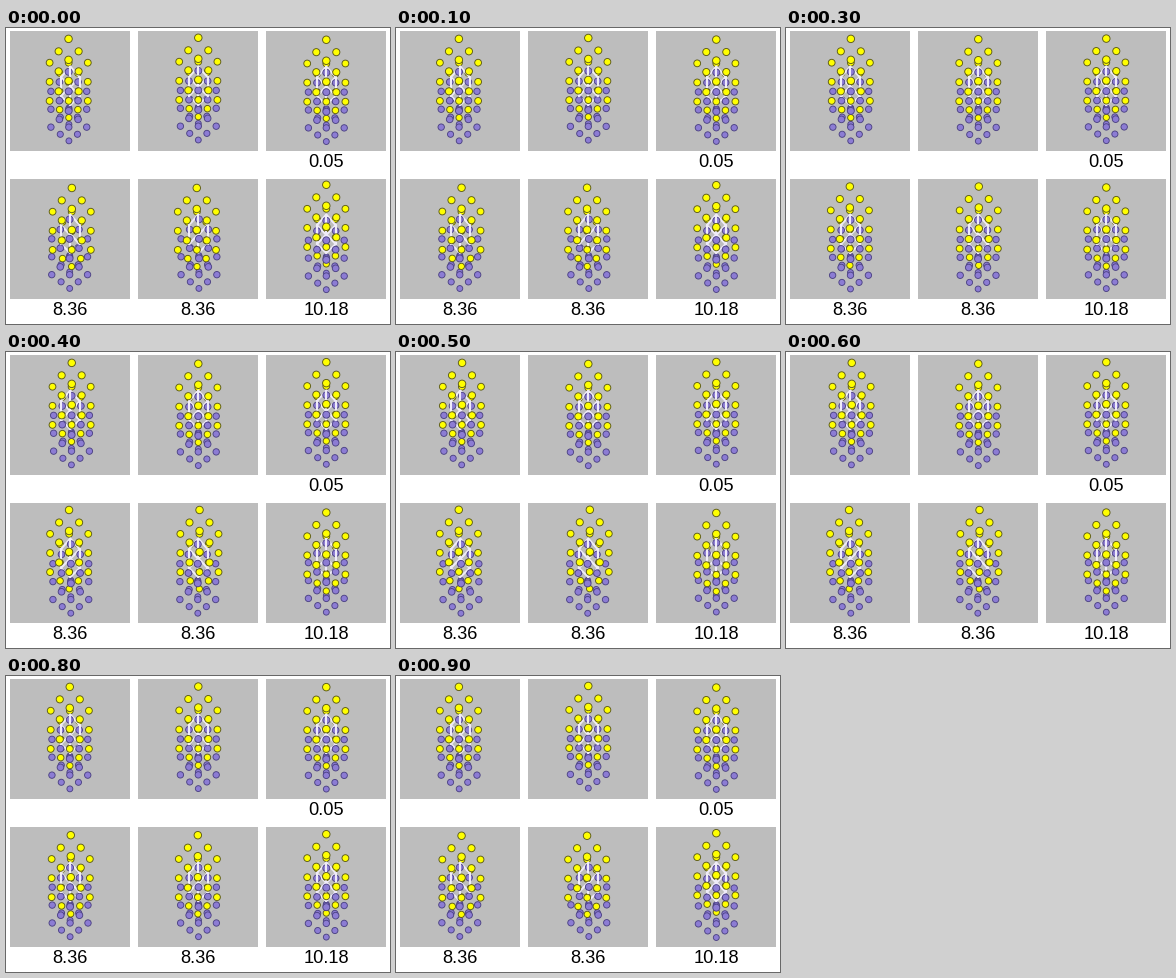
A matplotlib script that plays this animation: 384 by 296 pixels, repeating every 1 s.

```python
from itertools import product

import numpy as np
import matplotlib.pyplot as plt
from matplotlib.animation import FuncAnimation

W, H, DPI = 384, 296, 100
FRAMES, INTERVAL = 10, 100
PX = 72 / DPI
PANEL = 120
CAMERA = 300  # viewing distance in pixels
BOND = 19.1   # length of a primitive lattice vector

# Primitive fcc vectors as (right, down, away), 60 degrees apart.
A1, A2, A3 = LATTICE = BOND * np.array(
    [(-0.5, 0.5, 0.5 ** 0.5), (0.5, 0.5, 0.5 ** 0.5), (0, 1, 0)])
DIAGONAL = LATTICE.sum(axis=0)
CENTRE = np.array([0, -9.6, 0])  # middle yellow atom, from the panel's middle

# face, edge, offset along the diagonal
YELLOW = ("#ffff00", "#5c5a18", 0)
PURPLE = ("#8c7cd4", "#4c4284", 0.75)

# label, yellow amplitude, purple amplitude
MODES = [
    ("", (1.6, 0), (1.6, 0)),
    ("", (0, 1.0), (0, 1.0)),
    ("0.05", (0, -0.8), (0, -0.8)),
    ("8.36", (-1.4, -1.0), (0.7, 0.5)),
    ("8.36", (1.4, -1.0), (-0.7, 0.5)),
    ("10.18", (0, 1.9), (0, -0.95)),
]

fig = plt.figure(figsize=(W / DPI, H / DPI), dpi=DPI, facecolor="white")
ax = fig.add_axes([0, 0, 1, 1])
ax.set(xlim=(0, W), ylim=(H, 0))
ax.axis("off")


def project(point):
    """Perspective view of a point: its flat position and its scale."""
    scale = CAMERA / (CAMERA + point[2])
    return point[:2] * scale, scale


def draw_cell(middle):
    """Draw the twelve edges of the primitive cell, nearer ones on top."""
    origin = CENTRE - DIAGONAL * 3 / 8
    for axis in range(3):
        others = [LATTICE[i] for i in range(3) if i != axis]
        for i, j in product((0, 1), repeat=2):
            start = origin + i * others[0] + j * others[1]
            end = start + LATTICE[axis]
            ends = np.array([project(p)[0] + middle for p in (start, end)])
            ax.plot(*ends.T, color="#efebf8", lw=2.1 * PX,
                    solid_capstyle="round", zorder=500 - (start + end)[2] / 2)


def add_atoms(middle, species, amplitude):
    """Add a 3 x 3 x 3 block of atoms; return (circle, rest, amplitude)."""
    face, edge, offset = species
    atoms = []
    for n in product((-1, 0, 1), repeat=3):
        point = CENTRE + n @ LATTICE + offset * DIAGONAL
        flat, scale = project(point)
        circle = plt.Circle(flat + middle, 3.4 * scale, fc=face, ec=edge,
                            lw=0.9 * PX, zorder=500 - point[2])
        ax.add_patch(circle)
        atoms.append((circle, flat + middle, scale * np.array(amplitude)))
    return atoms


atoms = []
for index, (label, yellow_swing, purple_swing) in enumerate(MODES):
    row, column = divmod(index, 3)
    left, top = 4 + 128 * column, 3 + 148 * row
    middle = np.array([left + PANEL / 2 + 0.3, top + PANEL / 2 + 0.4])
    ax.add_patch(plt.Rectangle((left, top), PANEL, PANEL, fc="#bdbdbd", lw=0))
    draw_cell(middle)
    atoms += add_atoms(middle, YELLOW, yellow_swing)
    atoms += add_atoms(middle, PURPLE, purple_swing)
    ax.text(left + 60, top + 136, label, family="Liberation Sans",
            size=18.3 * PX, ha="center", va="baseline", color="black")


def update(frame):
    swing = -np.cos(2 * np.pi * frame / FRAMES)
    for circle, rest, amplitude in atoms:
        circle.center = rest + swing * amplitude
    return [atom[0] for atom in atoms]


anim = FuncAnimation(fig, update, frames=FRAMES, interval=INTERVAL,
                     repeat=True, repeat_delay=0, blit=False)
plt.show()
```
